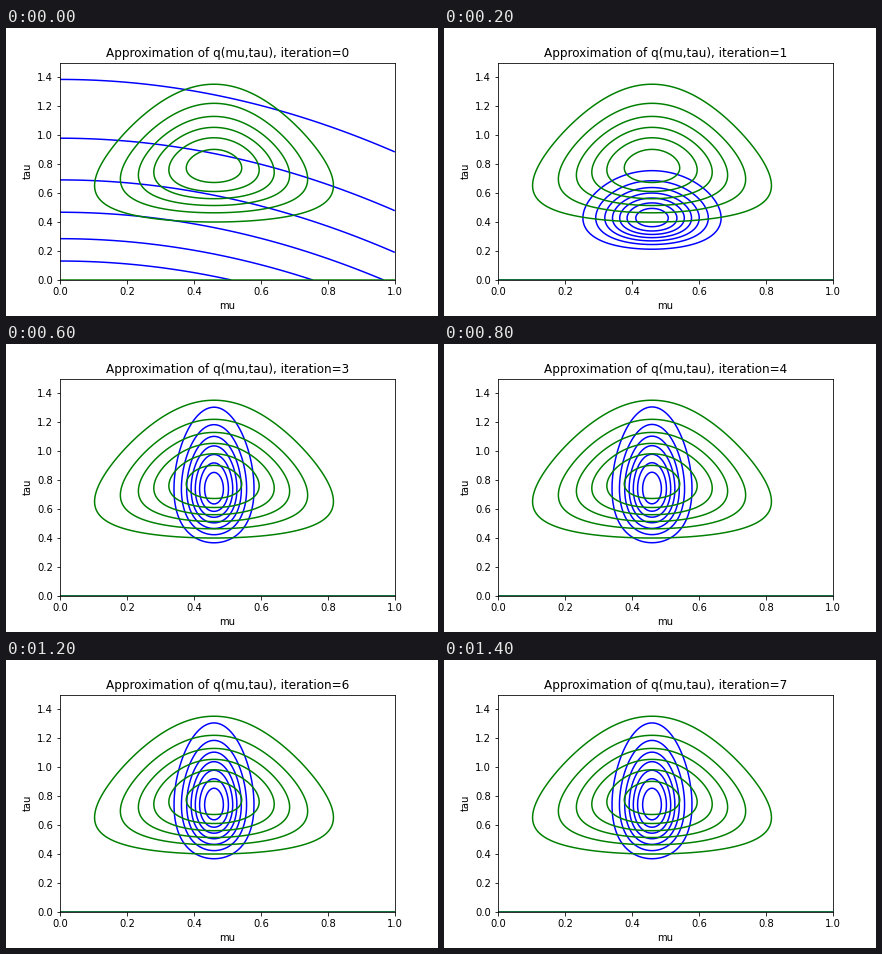
Recreate the animation shown at these times as a matplotlib script. Size 432 by 288 pixels, loop 1600 ms.

```python
import math

import matplotlib.pyplot as plt
import numpy as np
from matplotlib.animation import FuncAnimation

FRAMES, INTERVAL = 8, 200
MEAN, KAPPA = 0.46, 21

plt.rcParams["font.family"] = "DejaVu Sans"
mu, tau = np.meshgrid(np.linspace(0, 1, 201), np.linspace(0, 1.5, 201))


def gamma_pdf(x, shape, rate):
    return rate**shape * x ** (shape - 1) * np.exp(-rate * x) / math.gamma(shape)


def normal_pdf(x, mean, scale):
    z = (x - mean) / scale
    return np.exp(-z * z / 2) / (scale * math.sqrt(2 * math.pi))


def exact_posterior():
    precision = KAPPA * tau
    bell = np.sqrt(precision / (2 * math.pi)) * np.exp(-precision * (mu - MEAN) ** 2)
    return bell * gamma_pdf(tau, 11, 13.44)


def approximation(iteration):
    """Factorised q(mu)q(tau) after the given number of updates."""
    mean, lam, shape, rate = 0, 1, 1, 1
    for _ in range(iteration):
        mean, shape = MEAN, 11.5
        rate = 13.55 + 11 / lam
        lam = KAPPA * shape / rate
    return normal_pdf(mu, mean, 1 / lam) * gamma_pdf(tau, shape, rate)


posterior = exact_posterior()
fig = plt.figure(figsize=(6, 4), dpi=72, facecolor="white")
ax = fig.add_axes([0.125, 0.125, 0.775, 0.755])


def draw(iteration):
    ax.clear()
    step = 1.5 if iteration else 0.05
    ax.contour(mu, tau, approximation(iteration), levels=step * np.arange(8),
               colors="blue", linewidths=1.5)
    ax.contour(mu, tau, posterior, levels=0.4 * np.arange(7),
               colors="green", linewidths=1.5)
    ax.set(xlim=(0, 1), ylim=(0, 1.5), xlabel="mu", ylabel="tau",
           xticks=np.arange(0, 1.1, 0.2), yticks=np.arange(0, 1.5, 0.2))
    ax.set_title(f"Approximation of q(mu,tau), iteration={iteration}")
    return []


anim = FuncAnimation(fig, draw, frames=FRAMES, interval=INTERVAL,
                     init_func=lambda: [], repeat=True, repeat_delay=0)
plt.show()
```
